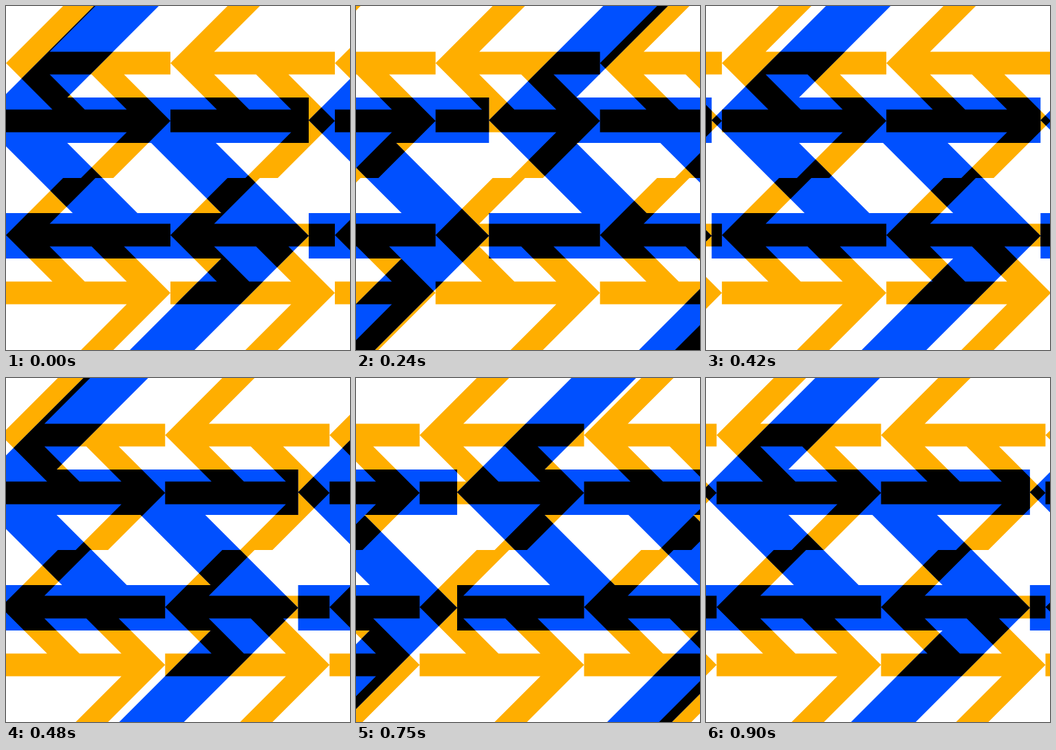
An HTML page with a canvas that plays this animation: 500 px wide and 500 px high, repeating every 0.93 s.

```html
<!DOCTYPE html>
<html lang="en">
<head>
<meta charset="utf-8">
<title>Arrows</title>
<style>
  html, body { margin: 0; width: 100%; height: 100%; overflow: hidden; background: #fff; }
  canvas { display: block; }
</style>
</head>
<body>
<canvas id="stage" width="500" height="500"></canvas>
<script>
const SIZE = 500;
const STEPS = 31;
const STEP_MS = 30;
const TILE_W = 239;
const TILE_H = 250;
const ORANGE = '#ffae00';
const BLUE = '#0050ff';

const ctx = document.getElementById('stage').getContext('2d');

// Arrow pointing left, with its tip on the left edge of the tile.
const tip = 83, arm = 47, half = 16.5;
const notch = arm + half;
const arrow = [
  [0, tip], [tip, 0], [tip + arm, 0], [notch, tip - half],
  [TILE_W, tip - half], [TILE_W, tip + half], [notch, tip + half],
  [tip + arm, 2 * tip], [tip, 2 * tip]
];
// The opposite arrow is the same one turned by half a turn.
const turned = arrow.map(([x, y]) => [TILE_W - x, TILE_H - y]);

function pattern(scale, shift) {
  const path = new Path2D();
  const width = TILE_W * scale;
  const height = TILE_H * scale;
  const start = ((shift % width) + width) % width - width;
  for (let y = 0; y < SIZE; y += height) {
    for (let x = start; x < SIZE; x += width) {
      for (const shape of [arrow, turned]) {
        shape.forEach(([px, py], i) => {
          path[i ? 'lineTo' : 'moveTo'](x + px * scale, y + py * scale);
        });
        path.closePath();
      }
    }
  }
  return path;
}

function fill(path, color) {
  ctx.fillStyle = color;
  ctx.fill(path);
}

function draw(time) {
  const progress = Math.floor(time / STEP_MS) % STEPS / STEPS;
  const small = pattern(1, -2 * TILE_W * progress);
  const large = pattern(2, -38 - 4 * TILE_W * progress);

  ctx.fillStyle = '#fff';
  ctx.fillRect(0, 0, SIZE, SIZE);
  fill(small, ORANGE);
  fill(large, BLUE);

  // Overlaps are black.
  ctx.save();
  ctx.clip(small);
  fill(large, '#000');
  ctx.restore();
}

function tick() {
  draw(performance.now());
  requestAnimationFrame(tick);
}
tick();
</script>
</body>
</html>
```
